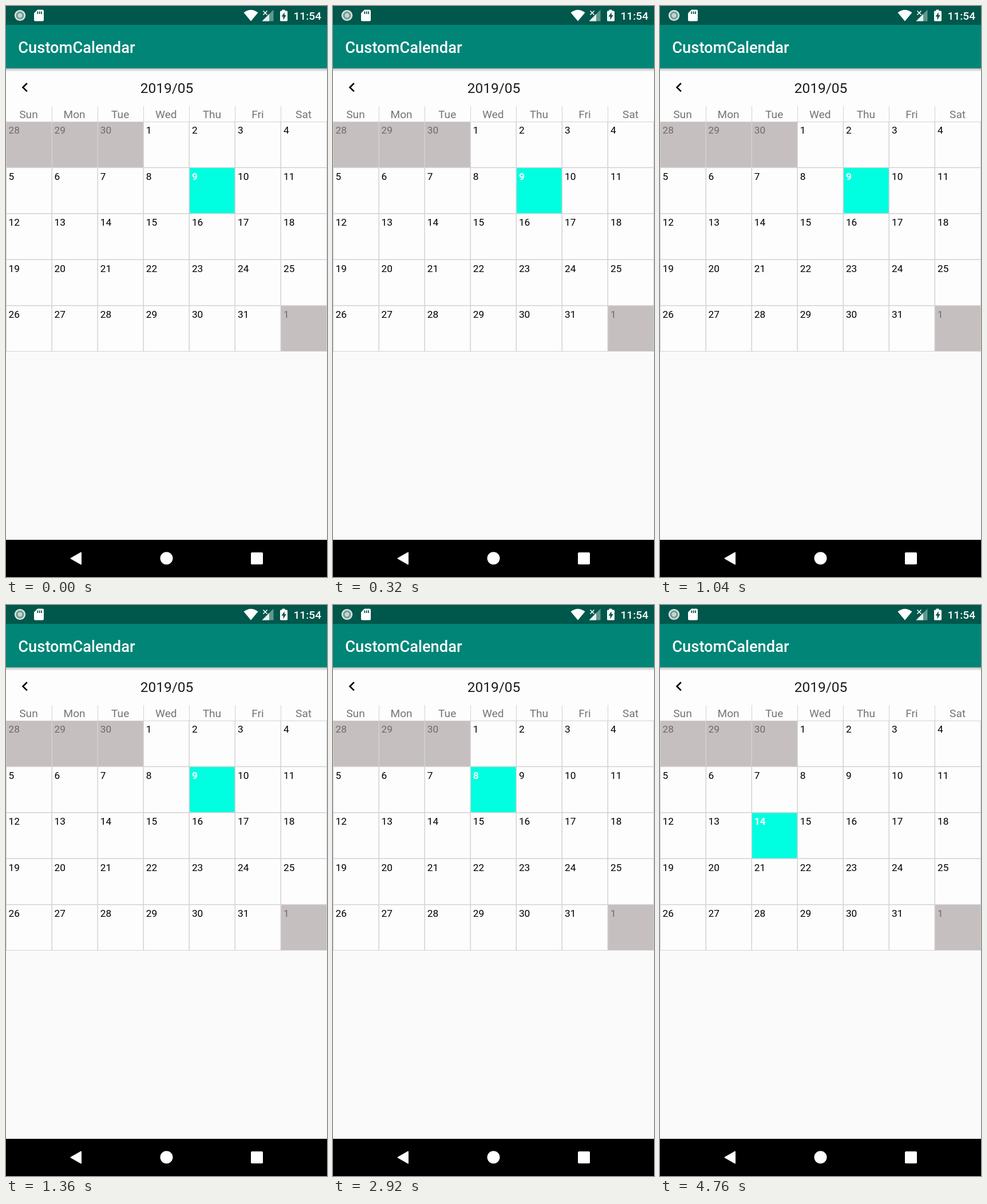
Write an HTML page that moves like this. It is 561x998 px and loops after 8000 ms.

```html
<!DOCTYPE html>
<html lang="en">
<head>
<meta charset="utf-8">
<title>Calendar</title>
<style>
  html, body { margin: 0; width: 100%; height: 100%; overflow: hidden; background: #fafafa; }
  svg { display: block; width: 561px; height: 998px; font-family: Roboto, sans-serif; }
  .medium { font-weight: 500; fill: #fff; }
  .head { font-size: 19.1px; fill: #737373; text-anchor: middle; }
  .day { font-size: 17.3px; fill: #000; }
  .muted { fill: #6f6a6b; }
  .pick { visibility: hidden; animation: 8s step-end infinite; }
  .pick text { fill: #fff; font-weight: 700; }
  #pick9 { animation-name: first; }
  #pick8 { animation-name: second; }
  #pick15 { animation-name: third; }
  #pick14 { animation-name: fourth; }
  @keyframes first { 0% { visibility: visible; } 36.5%, 100% { visibility: hidden; } }
  @keyframes second { 0% { visibility: hidden; } 36.5% { visibility: visible; } 49.5%, 100% { visibility: hidden; } }
  @keyframes third { 0% { visibility: hidden; } 49.5% { visibility: visible; } 59.5%, 100% { visibility: hidden; } }
  @keyframes fourth { 0% { visibility: hidden; } 59.5%, 100% { visibility: visible; } }
</style>
</head>
<body>
<svg viewBox="0 0 561 998">
  <defs>
    <linearGradient id="shade" x2="0" y2="1">
      <stop offset="0" stop-color="#000" stop-opacity=".26"/>
      <stop offset="1" stop-color="#000" stop-opacity="0"/>
    </linearGradient>
  </defs>
  <rect width="561" height="998" fill="#fafafa"/>
  <rect y="109" width="561" height="495" fill="#fdfdfd"/>
  <rect y="109" width="561" height="6" fill="url(#shade)"/>
  <rect y="33" width="561" height="76" fill="#008577"/>
  <rect width="561" height="33" fill="#00574b"/>

  <!-- status bar -->
  <circle cx="24.5" cy="16.5" r="8.6" fill="#8fb0aa" stroke="#e3ecea" stroke-width="2"/>
  <circle cx="24.5" cy="16.5" r="5" fill="#c3d4d0" stroke="#5f8f87" stroke-width="1.6"/>
  <path d="M55 6.5h9q2 0 2 2v16q0 2-2 2H51q-2 0-2-2V12.500z" fill="#fff"/>
  <path d="M55.300 9.500v4.500M58.700 9.500v4.500M62.100 9.500v4.500" stroke="#00574b" stroke-width="1.800"/>
  <path d="M428 26.500L415.500 11.500Q428 2 440.500 11.500z" fill="#fff"/>
  <path d="M467.500 6.500v20h-20z" fill="#fff" opacity=".38"/>
  <path d="M460 14v12.500h-12.500z" fill="#fff" opacity=".85"/>
  <path d="M449.500 8.500l7 7m0-7l-7 7" stroke="#fff" stroke-width="1.600"/>
  <path d="M482.500 8.500v-2h5v2h3q1.500 0 1.500 1.500v15q0 1.500-1.500 1.500h-10q-1.500 0-1.500-1.500V10q0-1.500 1.500-1.500z" fill="#fff"/>
  <path d="M486.700 11v5h3l-5.200 8.500v-6h-3z" fill="#00574b"/>
  <text class="medium" x="551" y="24.200" font-size="19.100" text-anchor="end">11:54</text>

  <text class="medium" x="21.300" y="81.500" font-size="27.300">CustomCalendar</text>
  <path d="M36.800 135l-7.300 7.200 7.300 7.200" fill="none" stroke="#000" stroke-width="2.600"/>
  <text x="281" y="152" font-size="24.500" fill="#1c1c1e" text-anchor="middle">2019/05</text>

  <g id="calendar"></g>

  <!-- navigation bar -->
  <rect y="933" width="561" height="65" fill="#000"/>
  <path d="M113.500 965.500L131 955.500v20z" fill="#fff" stroke="#fff" stroke-width="2" stroke-linejoin="round"/>
  <circle cx="280.500" cy="965.300" r="11" fill="#fff"/>
  <rect x="428" y="955" width="21" height="21" rx="1.800" fill="#fff"/>
</svg>
<script>
  const COL = 80.1, ROW = 80.4, TOP = 202;
  const names = ['Sun', 'Mon', 'Tue', 'Wed', 'Thu', 'Fri', 'Sat'];
  const rect = (x, y, w, h, fill) =>
    `<rect x="${x}" y="${y}" width="${w}" height="${h}" fill="${fill}"/>`;
  const text = (x, y, cls, value) => `<text x="${x}" y="${y}" class="${cls}">${value}</text>`;

  function cell(index, label, fill, cls = '') {
    const x = index % 7 * COL, y = TOP + Math.floor(index / 7) * ROW;
    return rect(x, y, COL, ROW, fill) + text(x + 4.5, y + 21.4, 'day ' + cls, label);
  }

  let out = names.map((n, i) => text(39.5 + i * COL, 196, 'head', n)).join('');
  for (let i = 0; i < 35; i++) {
    const date = i - 2;
    if (date < 1) out += cell(i, date + 30, '#c6bfbf', 'muted');
    else if (date > 31) out += cell(i, date - 31, '#c6bfbf', 'muted');
    else out += cell(i, date, '#fdfdfd');
  }
  for (const date of [9, 8, 15, 14])
    out += `<g id="pick${date}" class="pick">${cell(date + 2, date, '#00ffe0')}</g>`;

  const line = '#d2d2d5';
  for (let c = 1; c < 7; c++) {
    out += rect(c * 80, 175, 1, 27, line);
    out += rect(c * 80 - 0.5, TOP, 1.5, 402, line);
  }
  for (let r = 1; r < 5; r++) out += rect(0, TOP + r * ROW - 0.7, 561, 1.5, line);
  out += rect(0, TOP, 561, 1, line) + rect(0, 603, 561, 1, line);
  out += rect(0, TOP, 1, 402, line) + rect(560, TOP, 1, 402, line);
  document.getElementById('calendar').innerHTML = out;
</script>
</body>
</html>
```
